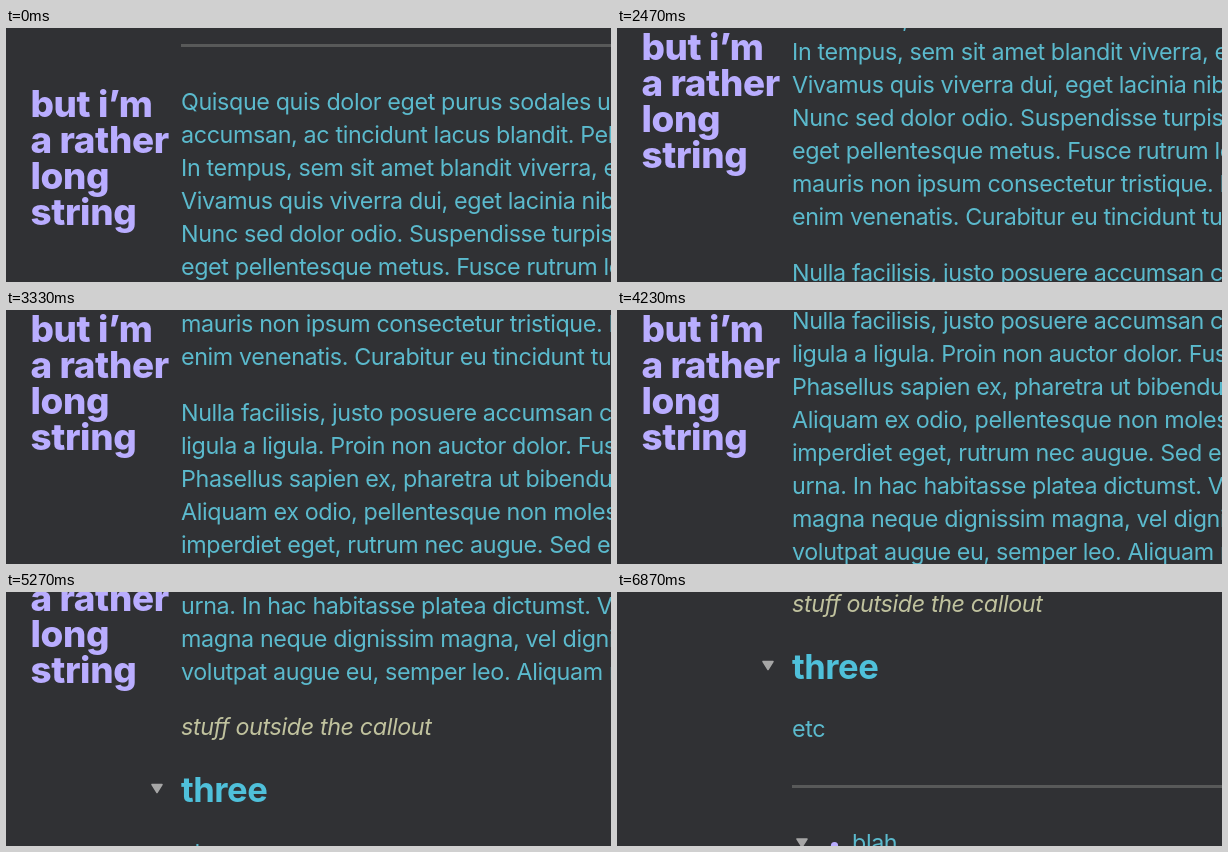
Write an HTML page that moves like this. It is 605x254 px and loops after 8.66 s.

```html
<!DOCTYPE html>
<html lang="en">
<head>
<meta charset="utf-8">
<title>Sticky heading</title>
<style>
  html, body { margin: 0; width: 100%; height: 100%; overflow: hidden; background: #303134; }
  svg { display: block; width: 605px; height: 254px; font-family: Inter, sans-serif; }
  text { white-space: pre; }
  .body, .aside { font-size: 23.3px; letter-spacing: -.016em; }
  .body { fill: #5bbacd; }
  .aside { font-style: italic; fill: #c0c29e; }
  .title { font-size: 36.8px; font-weight: 800; letter-spacing: -.01em; fill: #b9adff; }
  .sub { font-size: 34.6px; font-weight: 750; letter-spacing: -.014em; fill: #4fc0da; }
  .rule { fill: #585959; }
  .fold { fill: #a6a6a6; stroke: #a6a6a6; stroke-width: 1.5; stroke-linejoin: round; }
  .dot { fill: #b9adff; }
</style>
</head>
<body>
<svg viewBox="0 0 605 254">
  <rect width="605" height="254" fill="#303134"/>
  <g id="page"></g>
  <g id="heading"></g>
</svg>
<script>
const LOOP = 8660;
const STICK = 57;      // scroll at which the heading pins
const RELEASE = 463;   // scroll at which its section pushes it out
const LINE = 33;

const page = document.getElementById('page');
const heading = document.getElementById('heading');

function add(parent, tag, attrs, text = '') {
  const el = document.createElementNS('http://www.w3.org/2000/svg', tag);
  for (const key in attrs) el.setAttribute(key, attrs[key]);
  el.textContent = text;
  parent.append(el);
}

function lines(parent, cls, x, y, step, rows) {
  rows.forEach((row, i) => add(parent, 'text', { class: cls, x, y: y + i * step }, row));
}

const rule = y => add(page, 'rect', { class: 'rule', x: 175, y, width: 430, height: 3 });
const fold = (x, y) => add(page, 'path', { class: 'fold', d: `M${x - 5} ${y - 4}h10l-5 8z` });

rule(16);
lines(page, 'body', 175, 82, LINE, [
  'Quisque quis dolor eget purus sodales ultrices',
  'accumsan, ac tincidunt lacus blandit. Pellentesque',
  'In tempus, sem sit amet blandit viverra, eros',
  'Vivamus quis viverra dui, eget lacinia nibh',
  'Nunc sed dolor odio. Suspendisse turpis nisl',
  'eget pellentesque metus. Fusce rutrum leo',
  'mauris non ipsum consectetur tristique. Nam',
  'enim venenatis. Curabitur eu tincidunt turpis'
]);
lines(page, 'body', 175, 369, LINE, [
  'Nulla facilisis, justo posuere accumsan congue',
  'ligula a ligula. Proin non auctor dolor. Fusce',
  'Phasellus sapien ex, pharetra ut bibendum',
  'Aliquam ex odio, pellentesque non molestie',
  'imperdiet eget, rutrum nec augue. Sed eu',
  'urna. In hac habitasse platea dictumst. Vivamus',
  'magna neque dignissim magna, vel dignissim',
  'volutpat augue eu, semper leo. Aliquam nec'
]);
lines(page, 'aside', 175, 655, LINE, ['stuff outside the callout']);
fold(151, 708.5);
lines(page, 'sub', 175, 722, LINE, ['three']);
lines(page, 'body', 175, 780, LINE, ['etc']);
rule(828);
fold(185, 886);
add(page, 'circle', { class: 'dot', cx: 217.5, cy: 888.5, r: 3.6 });
lines(page, 'body', 235, 894, LINE, ['blah']);

lines(heading, 'title', 24.5, 89, 36, ['but i’m', 'a rather', 'long', 'string']);

// Scroll knots: time in ms, offset in px, speed in px per ms
const KNOTS = [
  [1530, 1, 0], [1600, 1, 0], [2470, 116, .16], [3330, 258, .14], [4230, 350, .13],
  [5270, 512, 0], [5460, 512, 0], [5900, 598, 0], [6190, 598, 0], [6640, 633, 0],
  [6790, 633, 0], [6870, 635, 0]
];

function scrollAt(t) {
  if (t < KNOTS[0][0]) return 0;
  const i = KNOTS.findIndex(k => k[0] > t);
  if (i < 0) return KNOTS[KNOTS.length - 1][1];
  const [t0, p0, v0] = KNOTS[i - 1];
  const [t1, p1, v1] = KNOTS[i];
  const span = t1 - t0, u = (t - t0) / span, w = 1 - u;
  return w * w * (1 + 2 * u) * p0 + u * u * (3 - 2 * u) * p1
       + span * u * w * (w * v0 - u * v1);
}

function draw(t) {
  const s = Math.round(scrollAt(t));
  const lift = Math.min(s, STICK) + Math.max(0, s - RELEASE);
  page.setAttribute('transform', `translate(0 ${-s})`);
  heading.setAttribute('transform', `translate(0 ${-lift})`);
}

const start = performance.now();
function tick() {
  draw((performance.now() - start) % LOOP);
  requestAnimationFrame(tick);
}
tick();
</script>
</body>
</html>
```
